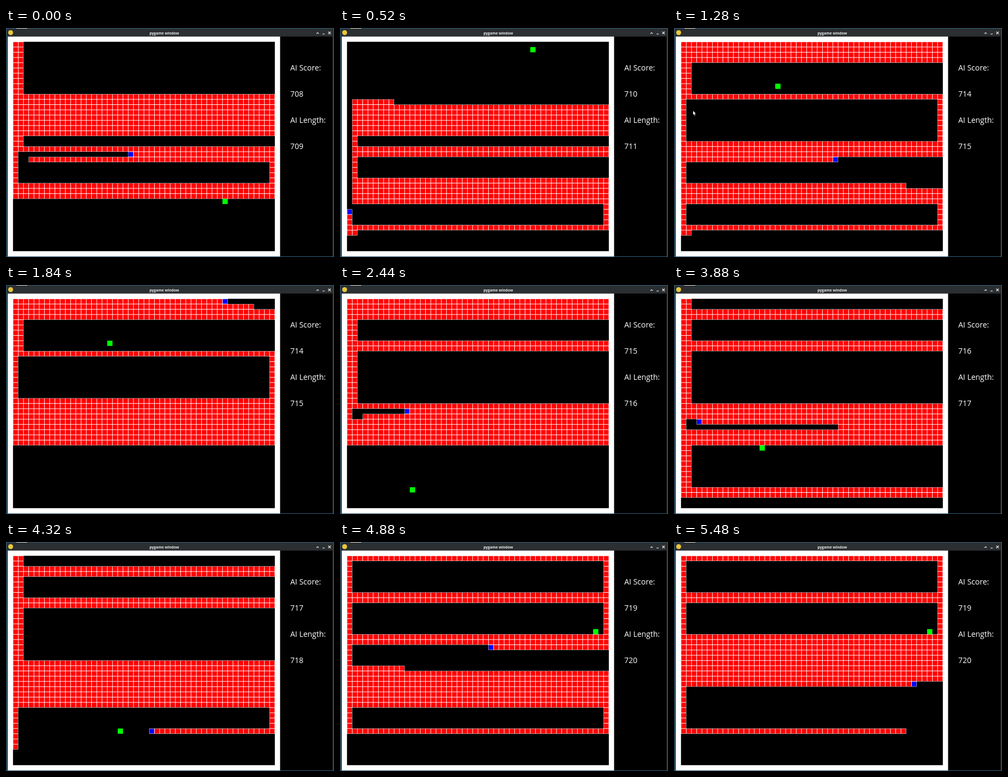
Animation of 600x420 px, one loop 5520 ms. Source, as an HTML page with a canvas:

```html
<!DOCTYPE html>
<html lang="en">
<head>
<meta charset="utf-8">
<title>Snake</title>
<style>
  html, body { margin: 0; width: 100%; height: 100%; overflow: hidden; background: #000; }
  canvas { display: block; }
</style>
</head>
<body>
<canvas id="stage" width="600" height="420"></canvas>
<script>
const ctx = document.getElementById('stage').getContext('2d');
const LOOP = 5520, STEP = 40, START = 708;
const LEFT = 12.8, TOP = 25.3, W = 9.58, H = 9.6, BORDER = 0.48;

// Rows swept in each lap, then the row where the snake turns back to column 0.
const laps = [
  ['22 27-29', 29],
  ['10-17 20-21 26-30 35', 36],
  ['0-3 10 19-27', 27],
  ['0-3 8-9 20-27 36-37', 37],
  ['2-3 8-9 20-28 33', 33],
  ['0 7-8 15-24']
];
const foods = [[40, 30], [0, 32], [35, 1], [30, 3], [25, 10], [38, 20],
  [18, 8], [12, 36], [15, 28], [20, 33], [24, 15], [47, 14]];
// Drawn step and number of cells travelled by then.
const pace = [[0, 0], [13, 329], [32, 796], [61, 1485], [85, 2038], [108, 2614], [137, 3317]];

const path = [[3, 22]];

function go(x, y) {
  let [px, py] = path[path.length - 1];
  while (px !== x || py !== y) {
    px += Math.sign(x - px);
    py += Math.sign(y - py);
    path.push([px, py]);
  }
}

function expand(rows) {
  return rows.split(' ').flatMap(part => {
    const [a, b = a] = part.split('-').map(Number);
    return Array.from({ length: b - a + 1 }, (_, i) => a + i);
  });
}

laps.forEach(([rows, end], lap) => {
  if (lap) go(1, 0);
  for (const row of expand(rows)) {
    go(path[path.length - 1][0], row);
    go(row % 2 ? 1 : 49, row);
  }
  if (end !== undefined) {
    go(1, end);
    go(0, end);
    go(0, 0);
  }
});

let last = START;
const eatenAt = foods.slice(0, -1).map(([x, y]) =>
  last = path.findIndex((p, i) => i > last && p[0] === x && p[1] === y));

function travelled(step) {
  let k = 1;
  while (k < pace.length - 1 && step > pace[k][0]) k++;
  const [s0, n0] = pace[k - 1], [s1, n1] = pace[k];
  return Math.round(n0 + (n1 - n0) * (step - s0) / (s1 - s0));
}

function rect(color, x, y, w, h) {
  ctx.fillStyle = color;
  ctx.fillRect(x, y, w, h);
}

function cell([c, r], color, inset = 0) {
  rect(color, LEFT + c * W + inset, TOP + r * H + inset, W - 2 * inset, H - 2 * inset);
}

function drawSnake(body) {
  // Adding the outlines keeps shared edges free of dark seams.
  ctx.globalCompositeOperation = 'lighter';
  body.forEach(p => cell(p, '#fff'));
  ctx.globalCompositeOperation = 'source-over';
  body.forEach((p, i) => cell(p, i < body.length - 1 ? '#f00' : '#00f', BORDER));
}

function text(str, x, y, font = '14px', color = '#fff', align = 'left') {
  ctx.font = font + ' "Open Sans", "Noto Sans", sans-serif';
  ctx.fillStyle = color;
  ctx.textAlign = align;
  ctx.fillText(str, x, y);
}

function line(...points) {
  ctx.beginPath();
  points.forEach(p => ctx.lineTo(...p));
  ctx.stroke();
}

function drawWindow() {
  rect('#2c5f80', 0, 0, 600, 420);
  rect('#e4e4e0', 19, 0, 20, 1);
  rect('#2b2f31', 1, 1, 598, 418);
  ctx.fillStyle = '#e8c73c';
  ctx.beginPath();
  ctx.arc(8.5, 8.5, 4.5, 0, 7);
  ctx.fill();
  text('pygame window', 289.5, 11.5, 'bold 6.7px', '#e6e6e6', 'center');
  ctx.strokeStyle = '#e0e0e0';
  ctx.lineWidth = 1.2;
  line([568, 10.5], [570, 8.5], [572, 10.5]);
  line([579, 11], [583, 11]);
  line([589.5, 6.8], [594, 11.2]);
  line([594, 6.8], [589.5, 11.2]);
  rect('#000', LEFT - W, TOP - H, 62 * W, 42 * H);
  rect('#fff', LEFT - W, TOP - H, 52 * W, 42 * H);
  rect('#000', LEFT, TOP, 50 * W, 40 * H);
}

function drawPointer(x, y) {
  ctx.fillStyle = '#fff';
  ctx.beginPath();
  [[0, 0], [0, 7], [1.6, 5.6], [2.8, 8.6], [4, 8], [2.8, 5.2], [4.8, 5]]
    .forEach(([dx, dy]) => ctx.lineTo(x + dx, y + dy));
  ctx.fill();
}

function draw() {
  const time = performance.now() % LOOP;
  const head = START + travelled(Math.floor(time / STEP));
  const eaten = eatenAt.filter(i => i <= head).length;
  const grown = eatenAt.filter(i => i < head).length;
  const score = START + eaten;

  drawWindow();
  cell(foods[eaten], '#0f0');
  drawSnake(path.slice(head - START - grown, head + 1));

  ['AI Score:', score, 'AI Length:', score + 1]
    .forEach((str, i) => text(str, 520, 78 + 48 * i));
  if (time >= 1160 && time < 1400) drawPointer(35, 152);
  requestAnimationFrame(draw);
}
draw();
</script>
</body>
</html>
```
